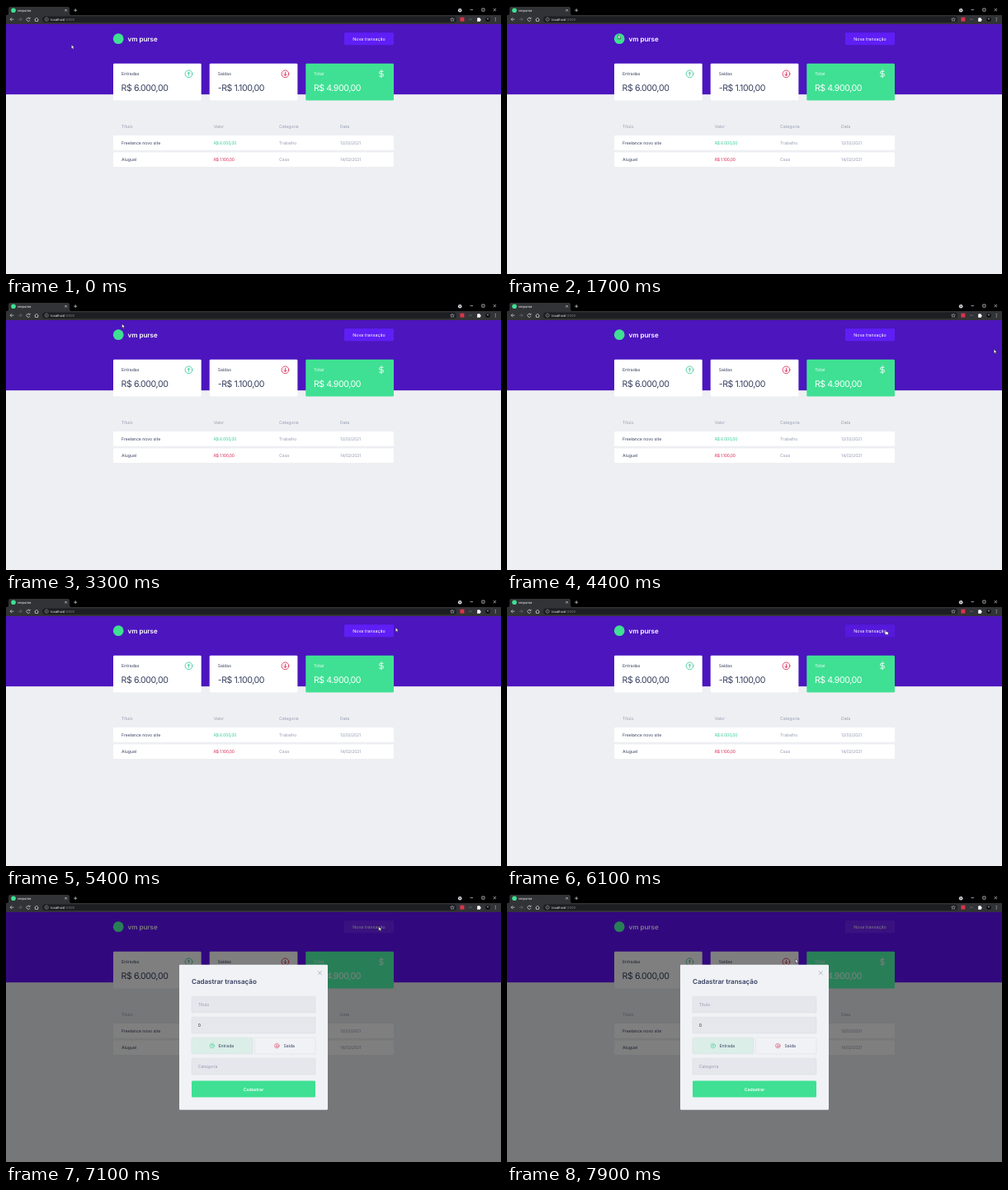
Animation, 600 px wide and 325 px high, one loop 8 s. Source, as an HTML page:

```html
<!DOCTYPE html>
<html lang="pt-BR">
<head>
<meta charset="utf-8">
<title>vm purse</title>
<style>
html, body { margin: 0; width: 100%; height: 100%; overflow: hidden; background: #eeeff2; }
svg {
  display: block; width: 600px; height: 325px;
  --purple: #4c15be; --violet: #5f1ef5; --green: #3fe093;
  font: 5.15px Inter, "Open Sans", sans-serif; text-rendering: geometricPrecision;
}
/* Saturated tones used beneath the half-black overlay */
#page.dim { --purple: #6410ff; --violet: #7424ff; --green: #50ffb0; }
#page.hover { --violet: #5519dc; }
.purple { fill: var(--purple); }
.violet { fill: var(--violet); }
.green { fill: var(--green); }
.white { fill: #fff; }
.dark { fill: #363f5f; }
.soft { fill: #969cb3; }
.up { fill: #33cc95; }
.down { fill: #dc2350; }
.sum { font-size: 10.6px; }
.num { letter-spacing: -.04em; }
.line { fill: none; stroke-width: 2; stroke-linecap: round; stroke-linejoin: round; }
.field { fill: #e5e7ec; stroke: #d5d7dc; stroke-width: .4; }
.bar { fill: none; stroke: #d8d9dc; stroke-width: .7; }
.bold { font-weight: 600; }
.mid { text-anchor: middle; }
</style>
</head>
<body>
<svg viewBox="0 0 600 325">
  <defs>
    <g id="arrow" class="line">
      <circle cx="12" cy="12" r="10.5"/>
      <path d="M12 17V7M8 11l4-4 4 4"/>
    </g>
  </defs>

  <g id="page">
    <rect y="22" width="600" height="303" fill="#eeeff2"/>
    <rect class="purple" y="22" width="600" height="85.2"/>
    <circle class="green" cx="136.2" cy="39.7" r="6.4"/>
    <text class="white bold" x="147.5" y="42.6" font-size="8">vm purse</text>
    <rect class="violet" x="410" y="32.2" width="60" height="15" rx="1.3"/>
    <text class="white mid" x="440" y="41.6" font-size="5.3">Nova transação</text>

    <rect class="white" x="130" y="69.7" width="106.7" height="44.8" rx="1.3"/>
    <rect class="white" x="246.7" y="69.7" width="106.7" height="44.8" rx="1.3"/>
    <rect class="green" x="363.3" y="69.7" width="106.7" height="44.8" rx="1.3"/>
    <text class="dark" x="140" y="84.2">Entradas</text>
    <text class="dark" x="256.7" y="84.2">Saídas</text>
    <text class="white" x="373.3" y="84.2">Total</text>
    <text class="dark sum num" x="139.6" y="103.4">R$ 6.000,00</text>
    <text class="dark sum num" x="256.7" y="103.4">-R$ 1.100,00</text>
    <text class="white sum num" x="372.9" y="103.4">R$ 4.900,00</text>
    <use href="#arrow" stroke="#33cc95" transform="translate(216.5 77.3) scale(.415)"/>
    <use href="#arrow" stroke="#dc2350" transform="translate(333.5 87.3) scale(.415 -.415)"/>
    <path class="line" stroke="#fff" transform="translate(450 77.2) scale(.42)"
      d="M12 1v22M17 5H9.5a3.5 3.5 0 0 0 0 7h5a3.5 3.5 0 0 1 0 7H6"/>

    <g class="soft">
      <text x="140" y="147.7">Título</text>
      <text x="251.7" y="147.7">Valor</text>
      <text x="331" y="147.7">Categoria</text>
      <text x="405" y="147.7">Data</text>
    </g>
    <rect class="white" x="130" y="157" width="340" height="17.7" rx=".8"/>
    <rect class="white" x="130" y="177.4" width="340" height="17.7" rx=".8"/>
    <text class="dark" x="140" y="167.8">Freelance novo site</text>
    <text class="up num" x="251.7" y="167.8">R$ 6.000,00</text>
    <text class="soft" x="331" y="167.8">Trabalho</text>
    <text class="soft num" x="405" y="167.8">12/02/2021</text>
    <text class="dark" x="140" y="188.2">Aluguel</text>
    <text class="down num" x="251.7" y="188.2">R$ 1.100,00</text>
    <text class="soft" x="331" y="188.2">Casa</text>
    <text class="soft num" x="405" y="188.2">14/02/2021</text>
  </g>

  <g id="modal">
    <rect y="22" width="600" height="303" opacity=".5"/>
    <rect x="210" y="85.7" width="180" height="176" rx="1.3" fill="#f0f2f5"/>
    <path id="close" class="line" stroke="#969cb3" stroke-width=".7" style="stroke-width:.7" d="M378.3 93.6l4 4m0-4l-4 4"/>
    <text class="dark bold" x="225" y="108.8" font-size="8">Cadastrar transação</text>
    <rect class="field" x="225" y="124.2" width="150" height="19.8" rx="1.3"/>
    <rect class="field" x="225" y="149.2" width="150" height="19.8" rx="1.3"/>
    <rect class="field" x="225" y="199.2" width="150" height="19.8" rx="1.3"/>
    <rect class="field" x="225" y="174.2" width="73.8" height="19.8" rx="1.3" style="fill:#dbeee7"/>
    <rect class="field" x="301.3" y="174.2" width="73.7" height="19.8" rx="1.3" style="fill:none"/>
    <text class="soft" x="232.7" y="136">Título</text>
    <text x="232.7" y="161" fill="#222">0</text>
    <text class="soft" x="232.7" y="211">Categoria</text>
    <use href="#arrow" stroke="#33cc95" transform="translate(246.7 181) scale(.26)"/>
    <use href="#arrow" stroke="#dc2350" transform="translate(325.2 187.2) scale(.26 -.26)"/>
    <text class="dark" x="257.5" y="186">Entrada</text>
    <text class="dark" x="336.5" y="186">Saída</text>
    <rect class="green" x="225" y="226.6" width="150" height="20" rx="1.3"/>
    <text class="white bold mid" x="300" y="238.5">Cadastrar</text>
  </g>

  <g id="browser">
    <rect width="600" height="22"/>
    <path d="M1 11q2 0 2-2V3q0-2 2-2h70q2 0 2 2v6q0 2 2 2h521v11H0V11z" fill="#323337"/>
    <rect x="44" y="12.6" width="502" height="7.4" rx="3.7" fill="#1d1e21"/>
    <circle cx="9" cy="5.2" r="2.8" fill="#3fe093"/>
    <text class="white" x="13.8" y="6.7" font-size="4">vmpurse</text>
    <text x="54.2" y="17.7" font-size="4.1" fill="#eee">localhost<tspan fill="#85878b">:3000</tspan></text>
    <path class="bar" d="M71.3 3.9l2.6 2.6m0-2.6l-2.6 2.6M82.2 5.2h4M84.2 3.2v4
      M9.3 16.2H5m2-2l-2 2 2 2M28.6 14.9a2.1 2.1 0 1 0 .4 2.2M29 13.8v1.5h-1.6
      M34.6 16.5l2.4-2.3 2.4 2.3M35.4 16v2.5h3.2V16
      M562.5 4.6h3.5M576.8 3h3.2v3.2h-3.2zM590.8 3l3.2 3.2m0-3.2l-3.2 3.2"/>
    <path class="bar" opacity=".35" d="M14.8 16.2h4.3m-2-2l2 2-2 2M561 16.2h4"/>
    <path class="bar" style="stroke-width:.45" d="M541 14l.7 1.6 1.7.1-1.3 1.1.4 1.7-1.5-.9-1.5.9.4-1.7-1.3-1.1 1.7-.1z
      M49.2 14.1a2.1 2.1 0 1 0 .01 0M49.2 16v1.3M49.2 15v.3"/>
    <circle cx="550.2" cy="5.2" r="2.3" fill="#d8d9dc"/>
    <path d="M549 4.7h2.4l-1.2 1.4z"/>
    <rect x="550.4" y="13.7" width="5" height="5" fill="#d8344b"/>
    <path class="white" d="M571 14.8h1.2a.8.8 0 0 1 1.6 0h1.2v1.2a.8.8 0 0 1 0 1.6v1.1h-4v-1.2a.8.8 0 0 0 0-1.5z"/>
    <circle cx="584" cy="16.2" r="2.8" fill="#111"/>
    <circle cx="584" cy="15.5" r=".9" fill="#999"/>
    <path class="bar" style="stroke-width:1;stroke-linecap:round" d="M593.3 14.4v.01m0 1.8v.01m0 1.8v.01"/>
  </g>

  <g id="pointer" fill="#fff" stroke="#111" stroke-width=".45" stroke-linejoin="round">
    <path id="tip" d="M0 0v5l1.2-1.1 .8 1.8 .9-.4-.8-1.7h1.6z"/>
    <path id="hand" d="M0 .5q.6-.9 1.1 0v2l2.2.5q.8.3.7 1.2l-.4 2H.7L-1 4.1q0-.8 1 0z"/>
  </g>
</svg>
<script>
const $ = id => document.getElementById(id);
const LOOP = 8000, STEP = 100;

// Pointer stops: time, x, y
const path = [
  [0, 79.3, 47], [700, 79.3, 47], [900, 92, 45], [1000, 92, 45], [1700, 134.5, 35],
  [2400, 136, 33], [2800, 140.5, 26.5], [3700, 140.5, 26.5], [4350, 594, 58],
  [4600, 557, 51], [5400, 472.2, 36], [5900, 458.3, 38.2], [6100, 458.3, 38.2],
  [6200, 456.3, 37.8], [7000, 456.3, 37.8], [7800, 349.6, 78.8], [8000, 349.6, 78.8]
];

function pointerAt(t) {
  const i = path.findIndex(p => p[0] > t);
  const [t0, x0, y0] = path[i - 1], [t1, x1, y1] = path[i];
  const u = (t - t0) / (t1 - t0), k = u * u * (3 - 2 * u);
  return [x0 + (x1 - x0) * k, y0 + (y1 - y0) * k];
}

const show = (id, on) => $(id).style.display = on ? "" : "none";

function draw(now) {
  const t = Math.floor(now % LOOP / STEP) * STEP;
  const [x, y] = pointerAt(t);
  const open = t >= 6200;
  const hover = !open && x > 410 && x < 470 && y > 32 && y < 47;
  $("page").setAttribute("class", open ? "dim" : hover ? "hover" : "");
  $("pointer").setAttribute("transform", `translate(${x} ${y})`);
  show("modal", open);
  show("close", t >= 6300);
  show("hand", hover);
  show("tip", !hover);
}

const start = performance.now();
function tick() {
  draw(performance.now() - start);
  requestAnimationFrame(tick);
}
tick();
</script>
</body>
</html>
```
